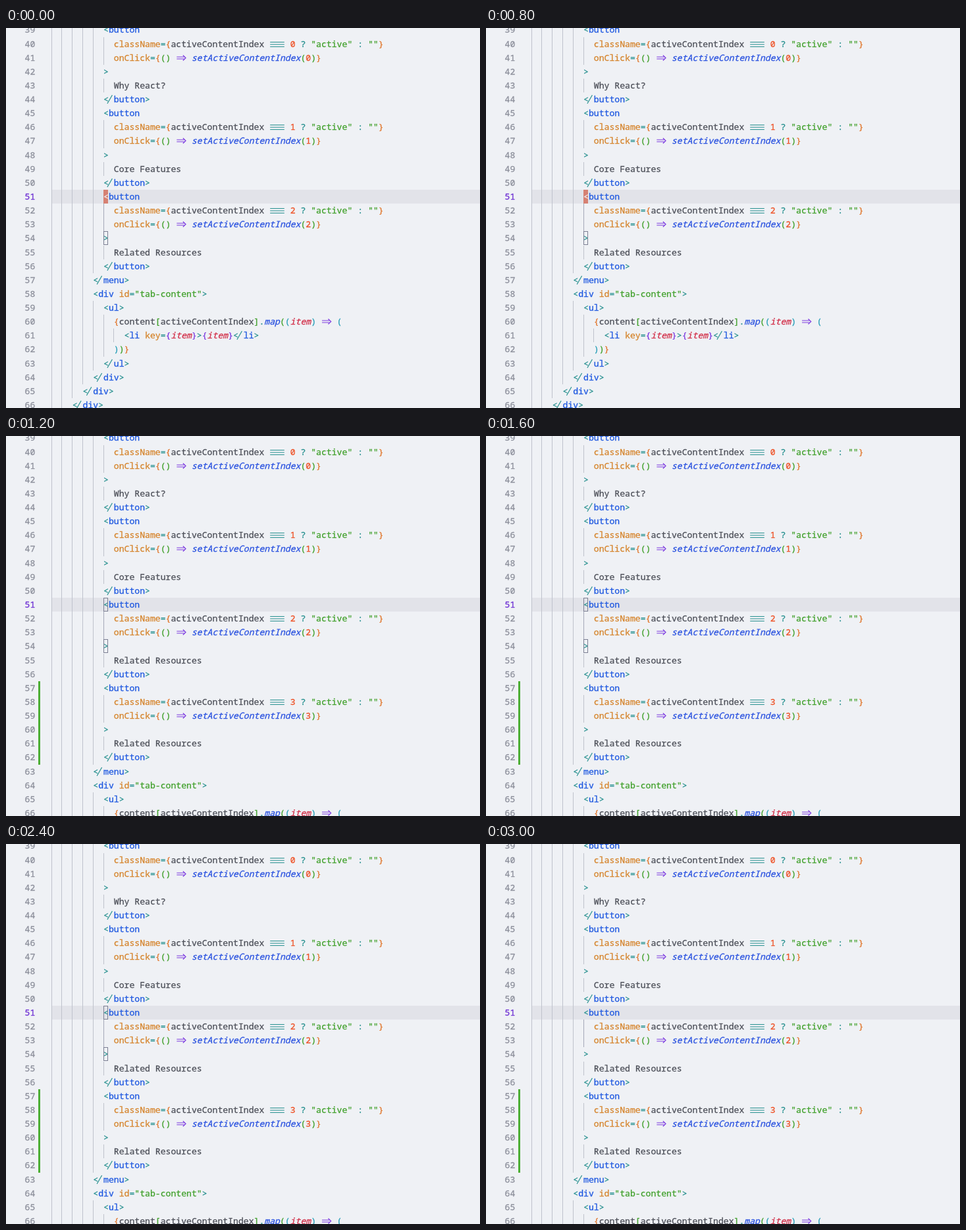
Animation, 720 px wide and 578 px high, one loop 3.1 s. Source, as an HTML page with a canvas:

```html
<!DOCTYPE html>
<html lang="en">
<head>
<meta charset="utf-8">
<title>Code editor</title>
<style>
  html, body { margin: 0; width: 100%; height: 100%; overflow: hidden; background: #eff1f5; }
  canvas { display: block; }
</style>
</head>
<body>
<canvas id="stage" width="720" height="578"></canvas>
<script>
const ctx = document.getElementById('stage').getContext('2d');
const LOOP = 3100, INSERT = 1000, BLUR = 2900;
const BLINK = 500, BLINK_OFF = 200;
const FIRST = 39, CURRENT = 51, CHAR = 7.88, LINE = 21.13, LEFT = 69.22;
const FONT = '13.13px "Noto Sans Mono", "DejaVu Sans Mono", monospace';

// Styles: ~ followed by one of these letters changes the colour; f and i are italic.
const COLORS = {
  x: '#4c4f58', t: '#27908f', b: '#1e58e0', y: '#d5832a', o: '#e0762c', g: '#40a02b',
  n: '#ee5328', m: '#7c3ae0', s: '#2a9fb8', f: '#2b53e0', i: '#d2304a'
};

const open = tag => `~t<~b${tag}`;
const close = tag => `~t</~b${tag}~t>`;

const button = (index, label) => [
  [10, open('button')],
  [12, `~yclassName~t=~o{~xactiveContentIndex ~t=== ~n${index} ~t? ~g"active" ~t: ~g""~o}`],
  [12, `~yonClick~t=~o{~g() ~m=> ~fsetActiveContentIndex~g(~n${index}~g)~o}`],
  [10, '~t>'],
  [12, `~x${label}`],
  [10, close('button')]
];

const head = [
  ...button(0, 'Why React?'),
  ...button(1, 'Core Features'),
  ...button(2, 'Related Resources')
];
const tail = [
  [8, close('menu')],
  [8, open('div') + ' ~yid~t=~g"tab-content"~t>'],
  [10, open('ul') + '~t>'],
  [12, '~o{~xcontent~g[~xactiveContentIndex~g]~t.~fmap~g(~s(~iitem~s) ~m=> ~s('],
  [14, open('li') + ' ~ykey~t=~m{~iitem~m}~t>~m{~iitem~m}' + close('li')],
  [12, '~s)~g)~o}'],
  [10, close('ul')],
  [8, close('div')],
  [6, close('div')],
  [4, close('div')]
];
const before = [...head, ...tail];
const after = [...head, ...button(3, 'Related Resources'), ...tail];

const colX = col => LEFT + col * CHAR;
const lineTop = n => Math.round(246 + (n - CURRENT) * LINE);
const baseline = n => Math.round(261 + (n - CURRENT) * LINE);

function rect(x, y, w, h, color) {
  ctx.fillStyle = color;
  ctx.fillRect(x, y, w, h);
}

function setPen(color, italic) {
  ctx.font = (italic ? 'italic ' : '') + FONT;
  ctx.fillStyle = ctx.strokeStyle = color;
}

// A hairline outline gives the letters a medium weight.
function glyph(char, x, y) {
  ctx.lineWidth = .3;
  ctx.fillText(char, x + CHAR / 2, y);
  ctx.strokeText(char, x + CHAR / 2, y);
}

function tripleEquals(x, y) {
  for (const dy of [-8, -4.5, -1]) ctx.fillRect(x + 1, y + dy, 3 * CHAR - 2, 1);
}

function arrow(x, y) {
  const mid = y - 4.5;
  ctx.fillRect(x + 1, mid - 2, 11.5, 1);
  ctx.fillRect(x + 1, mid + 1, 11.5, 1);
  ctx.lineWidth = 1.2;
  ctx.beginPath();
  ctx.moveTo(x + 10.5, mid - 4);
  ctx.lineTo(x + 14.7, mid);
  ctx.lineTo(x + 10.5, mid + 4);
  ctx.stroke();
}

function closingSlash(x, y) {
  ctx.lineWidth = 1.2;
  ctx.beginPath();
  ctx.moveTo(x - 2, y + 2);
  ctx.lineTo(x + 5.5, y - 11);
  ctx.stroke();
}

function drawCode(indent, code, y) {
  let x = colX(indent);
  for (const part of code.split('~').slice(1)) {
    const style = part[0];
    setPen(COLORS[style], 'fi'.includes(style));
    for (const token of part.slice(1).match(/===|=>|<\/|./g)) {
      if (token === '===') tripleEquals(x, y);
      else if (token === '=>') arrow(x, y);
      else if (token === '</') {
        glyph('<', x, y);
        closingSlash(x + CHAR, y);
      } else glyph(token, x, y);
      x += token.length * CHAR;
    }
  }
}

function drawGuides(n, indent) {
  const top = lineTop(n), height = lineTop(n + 1) - top;
  for (let col = 0; col < indent; col += 2) {
    const active = col === 10 && (n === 52 || n === 53);
    rect(Math.floor(colX(col)), top, 1, height, active ? '#a5a8b8' : '#bfc2cc');
  }
}

function drawMatch(n) {
  ctx.strokeStyle = '#7c7f93';
  ctx.lineWidth = 1;
  ctx.strokeRect(148.5, lineTop(n) + .5, 6, 20);
}

function draw(t) {
  const inserted = t >= INSERT, focused = t < BLUR;
  const cursor = focused && Math.floor((t - BLINK_OFF) / BLINK) % 2 !== 0;
  const lines = inserted ? after : before;

  rect(0, 0, 720, 578, '#eff1f5');
  rect(70, lineTop(CURRENT), 650, 21, '#e2e3e9');
  if (inserted) rect(49, lineTop(57), 3, lineTop(63) - lineTop(57), '#4cae34');
  ctx.textAlign = 'center';

  for (let n = FIRST; n <= 66; n++) {
    const [indent, code] = lines[n - FIRST];
    const y = baseline(n);
    drawGuides(n, indent);
    setPen(n === CURRENT ? '#6f32d4' : '#8c8f9b');
    [...String(n)].forEach((digit, i) => glyph(digit, 28.5 + i * CHAR, y));
    drawCode(indent, code, y);
  }

  if (!focused) return;
  drawMatch(54);
  if (cursor) {
    rect(148, lineTop(CURRENT), 7, 21, '#d68173');
    setPen('#eff1f5');
    glyph('<', colX(10), baseline(CURRENT));
  } else drawMatch(CURRENT);
}

function frame() {
  draw(performance.now() % LOOP);
  requestAnimationFrame(frame);
}
frame();
</script>
</body>
</html>
```
